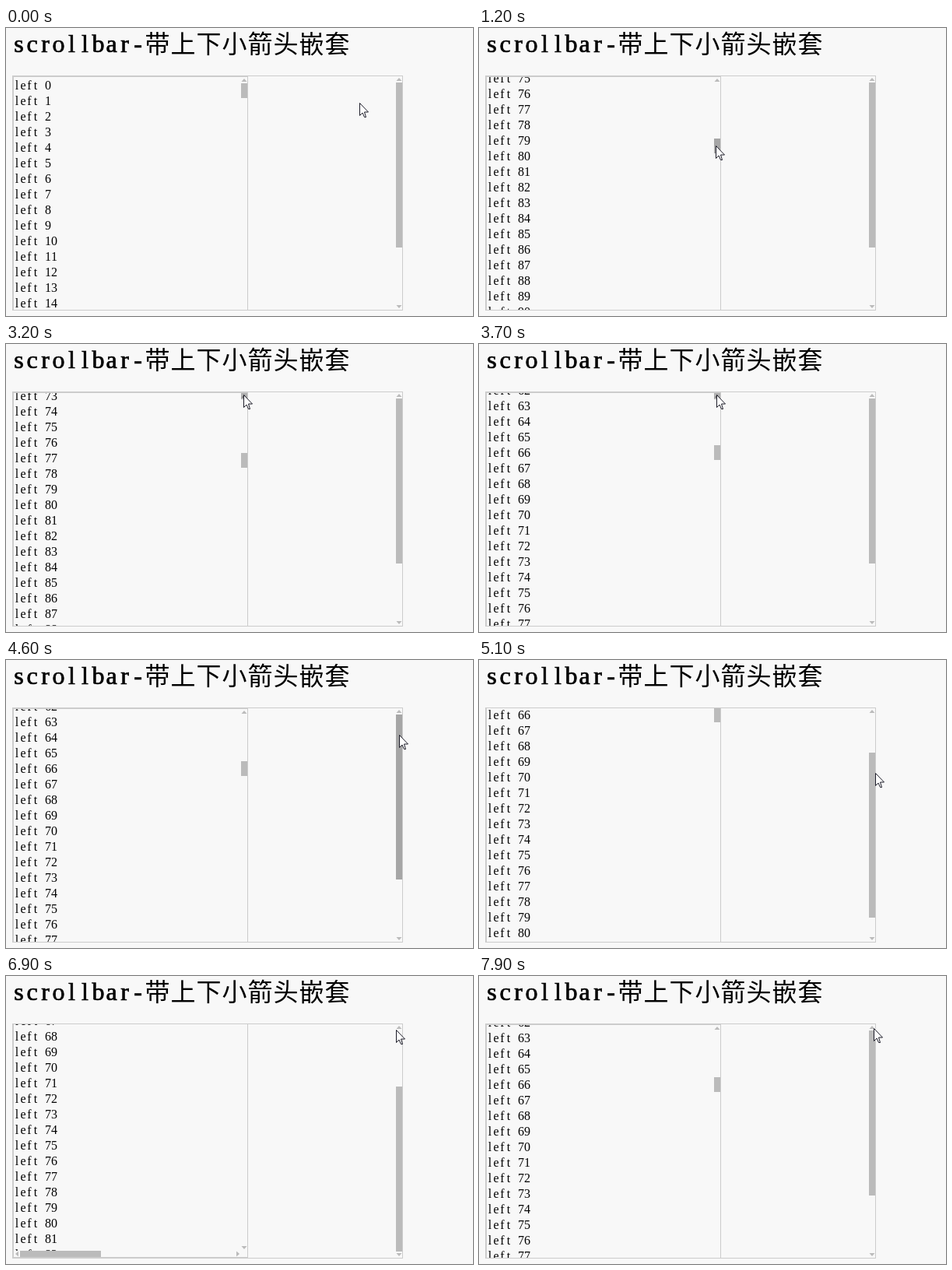
Write an HTML page that moves like this. It is 600 by 370 pixels and loops after 8000 ms.

```html
<!DOCTYPE html>
<html lang="zh">
<head>
<meta charset="utf-8">
<title>scrollbar</title>
<style>
  html, body { margin: 0; width: 100%; height: 100%; overflow: hidden; background: #f8f8f8; }
  #stage { display: block; width: 600px; height: 370px; }
  text { white-space: pre; text-anchor: middle; }
  .latin { font: 32px "Liberation Serif", serif; stroke: #000; stroke-width: .7; }
  .han { font: 500 32px "Noto Sans CJK SC", "Noto Sans CJK", sans-serif; }
  .line { font: 16px "Liberation Serif", serif; }
  .box { fill: none; stroke: #ccc; }
  .thumb, .arrow { fill: #bbb; }
  .thumb.hot { fill: #a6a6a6; }
  .arrow rect { fill: none; }
  .arrow.hot { fill: #777; }
  .arrow.hot rect { fill: #b0b0b0; }
</style>
</head>
<body>
<svg id="stage" viewBox="0 0 600 370">
  <defs><path id="tri" d="M.5 6 4 2 7.5 6z"/></defs>
  <g id="title"></g>
  <rect class="box" x="8.5" y="61.5" width="501" height="301"/>
  <svg x="9" y="62" width="500" height="300">
    <g id="pane">
      <rect class="box" x=".5" y=".5" width="301" height="401"/>
      <svg x="1" y="1" width="292" height="392"><g id="lines"></g></svg>
      <g class="arrow" id="innerUp" transform="translate(293 1)"><rect width="8" height="8"/><use href="#tri"/></g>
      <use class="arrow" href="#tri" transform="translate(293 385) rotate(180 4 4)"/>
      <use class="arrow" href="#tri" transform="translate(1 393) rotate(-90 4 4)"/>
      <use class="arrow" href="#tri" transform="translate(285 393) rotate(90 4 4)"/>
      <rect class="thumb" x="9" y="393" width="104" height="8"/>
      <rect class="thumb" id="innerThumb" x="293" width="8" height="19"/>
    </g>
    <use class="arrow" href="#tri" transform="translate(492 0)"/>
    <use class="arrow" href="#tri" transform="translate(492 292) rotate(180 4 4)"/>
    <rect class="thumb" id="outerThumb" x="492" width="8" height="212"/>
  </svg>
  <path id="cursor" fill="#fff" stroke="#1c1c28" d="M.5.5V16.5L4 13 6.5 18.5H8.5L6.5 12H11.5z"/>
</svg>
<script>
const LOOP = 8000, STEP = 100;
const INNER_RATIO = 21.26;      // text pixels per thumb pixel
const OUTER_RATIO = 102 / 72;
const $ = id => document.getElementById(id);

const START = { x: 454, y: 96, inner: 0, outer: 0 };
// [start ms, number of steps, values reached at the last step]
const MOVES = [
  [100, 4, { x: 293, y: 148 }],
  [500, 1, { x: 300, y: 150 }],
  [800, 1, { x: 304, y: 151 }],
  [1200, 1, { inner: 71 }],
  [1500, 4, { x: 487, y: 90 }],
  [1900, 5, { x: 322, y: 72 }],
  [2400, 5, { x: 305, y: 65 }],
  [3100, 2, { inner: 69 }],
  [3300, 5, { inner: 59 }],
  [4000, 7, { x: 505, y: 96 }],
  [4800, 4, { x: 509, y: 145, outer: 49 }],
  [5500, 2, { x: 515, y: 186, outer: 72 }],
  [6000, 4, { x: 498, y: 69 }],
  [6900, 1, { x: 501 }],
  [7000, 4, { x: 506 }],
  [7500, 1, { y: 70, outer: 0 }],
  [7600, 1, { x: 507 }],
  [7800, 2, { y: 67 }]
];

// Text on a fixed-pitch grid, each glyph centred in its cell
function gridText(kind, text, left, baseline, pitch) {
  const centres = [...text].map((_, i) => left + pitch * (i + .5));
  return `<text class="${kind}" x="${centres.join(" ")}" y="${baseline}">${text}</text>`;
}

$("title").innerHTML =
  gridText("latin", "scrollbar-", 8, 31, 17) +
  gridText("han", "带上下小箭头嵌套", 178, 32, 33);
$("lines").innerHTML = Array.from({ length: 110 }, (_, i) =>
  gridText("line", `left ${i}`, 0, 16 + 20 * i, 8)).join("");

function stateAt(t) {
  const state = { ...START };
  for (const [start, steps, goal] of MOVES) {
    if (t < start) break;
    const done = Math.min(Math.floor((t - start) / STEP) + 1, steps) / steps;
    for (const key in goal) state[key] += (goal[key] - state[key]) * done;
  }
  for (const key in state) state[key] = Math.round(state[key]);
  return state;
}

function draw(t) {
  const { x, y, inner, outer } = stateAt(t);
  const shift = Math.round(outer * OUTER_RATIO);
  const over = (left, top, height) => x >= left && x < left + 8 && y >= top && y < top + height;
  const move = (id, dx, dy) => $(id).setAttribute("transform", `translate(${dx} ${dy})`);

  move("pane", 0, -shift);
  move("lines", 0, -Math.round(inner * INNER_RATIO));
  move("cursor", x, y);
  $("innerThumb").setAttribute("y", 9 + inner);
  $("outerThumb").setAttribute("y", 8 + outer);
  $("innerThumb").classList.toggle("hot", over(302, 71 + inner - shift, 19));
  $("outerThumb").classList.toggle("hot", over(501, 70 + outer, 212));
  $("innerUp").classList.toggle("hot", over(302, 63 - shift, 8));
}

const begin = performance.now();
function tick() {
  draw((performance.now() - begin) % LOOP);
  requestAnimationFrame(tick);
}
tick();
</script>
</body>
</html>
```
